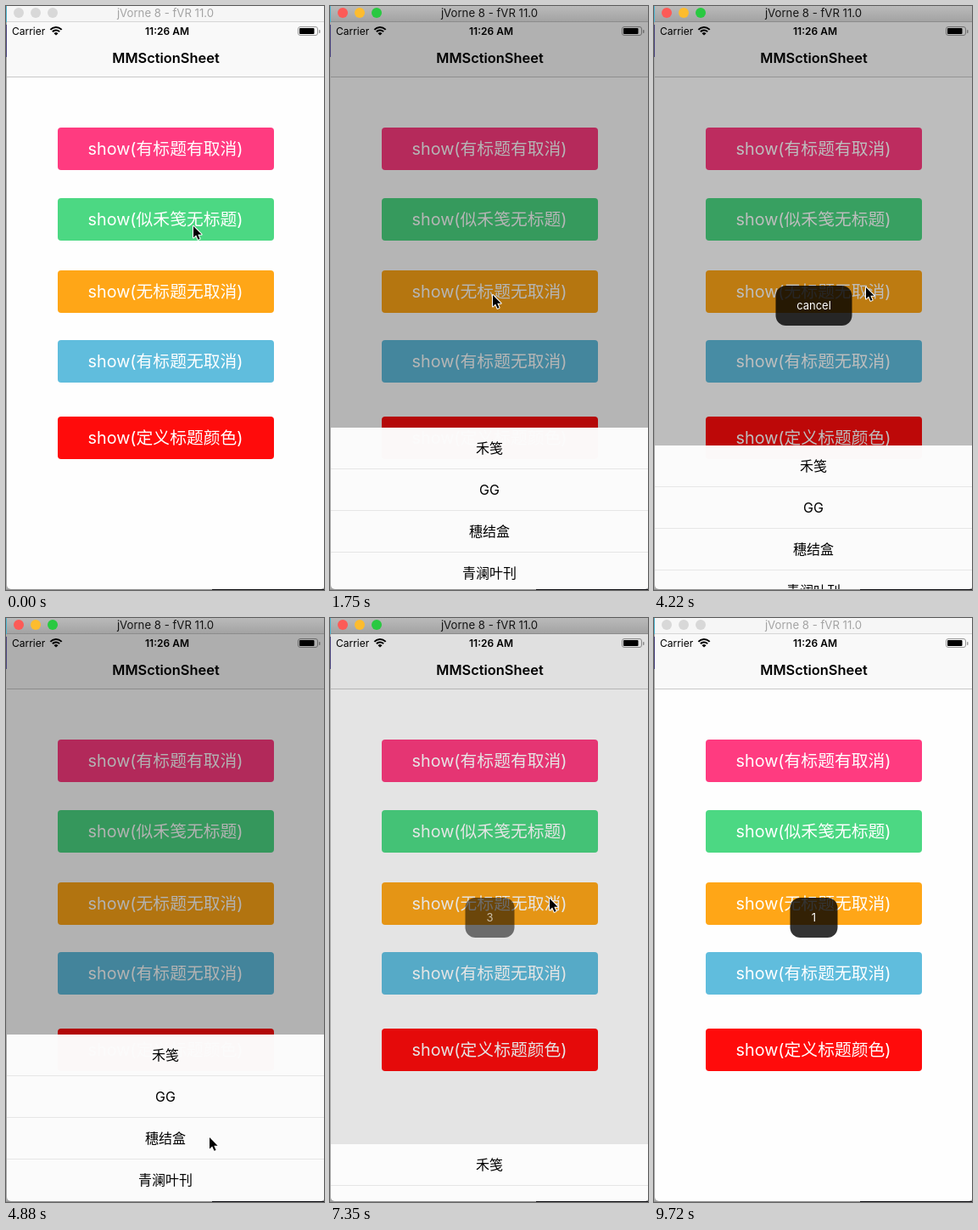
An HTML page with a canvas for the animation above (9.75 s loop, 375 by 687 pixels).

```html
<!DOCTYPE html>
<html lang="zh-CN">
<head>
<meta charset="utf-8">
<title>MMSctionSheet</title>
<style>
html, body { margin: 0; height: 100%; overflow: hidden; background: #fff; }
canvas { display: block; width: 375px; height: 687px; }
</style>
</head>
<body>
<canvas id="stage"></canvas>
<script>
const W = 375, H = 687, LOOP = 9750, SLIDE = 300, ROW = 49, BOTTOM = 686, MID = 188;
const canvas = document.getElementById('stage');
const ctx = canvas.getContext('2d');
const dpr = window.devicePixelRatio || 1;
canvas.width = W * dpr;
canvas.height = H * dpr;

const buttons = [
  [143, '#ff3b80', 'show(有标题有取消)'],
  [226, '#4cd883', 'show(似禾笺无标题)'],
  [311, '#ffa617', 'show(无标题无取消)'],
  [393, '#60bddd', 'show(有标题无取消)'],
  [483, '#ff0b0b', 'show(定义标题颜色)']
];
const rows = ['禾笺', 'GG', '穗结盒', '青澜叶刊'];
// Start of opening, start of closing
const sheets = [[1481, 2593], [3990, 5250], [7232, 8154]];
// Start, label, width
const toasts = [[2600, 'cancel', 90], [5265, '3', 58], [8154, '1', 56]];
// Time, x, y of the pointer tip
const path = [
  [30, 221, 258], [320, 192, 339], [1820, 192, 339], [2260, 309, 404],
  [2320, 309, 404], [2440, 328, 379], [2900, 328, 379], [3560, 253, 331],
  [3620, 250, 330], [4330, 250, 330], [4860, 240, 610], [5420, 240, 610],
  [5940, 337, 297], [6000, 337, 297], [6180, 364, 307], [6570, 364, 307],
  [7170, 259, 329], [7600, 259, 329], [8100, 217, 510], [8360, 217, 510],
  [8590, 315, 558], [8650, 315, 558], [9120, 328, 353]
];

const clamp = v => Math.min(1, Math.max(0, v));
const ease = v => { v = clamp(v); return v * v * (3 - 2 * v); };

function rect(x, y, w, h, color, radius = 0) {
  ctx.fillStyle = color;
  ctx.beginPath();
  ctx.roundRect(x, y, w, h, radius);
  ctx.fill();
}

function text(str, x, y, size, color, weight = 400, align = 'center') {
  ctx.font = `${weight} ${size}px Inter, "Noto Sans CJK SC", "Noto Sans CJK", sans-serif`;
  ctx.textAlign = align;
  ctx.fillStyle = color;
  ctx.fillText(str, x, y);
}

function disc(x, y, r, color) {
  ctx.fillStyle = color;
  ctx.beginPath();
  ctx.arc(x, y, r, 0, 7);
  ctx.fill();
}

function drawDesktop() {
  rect(0, 0, W, H, '#a9a9a9');
  rect(0, 0, 1, 19, '#4fb4cf');
  rect(0, 22, 1, 38, '#4b4580');
  rect(0, 686, 243, 1, '#909090');
  rect(243, 686, 132, 1, '#101014');
}

function drawTitleBar(active) {
  let fill = '#f6f6f6';
  if (active) {
    fill = ctx.createLinearGradient(0, 0, 0, 18);
    fill.addColorStop(0, '#bababa');
    fill.addColorStop(1, '#a3a3a3');
  }
  rect(1, 0, W, 18, fill);
  rect(1, 18, W, 1, active ? '#8c8c8c' : '#d6d6d6');
  const lights = active ? ['#fc5b57', '#fdbc2e', '#29c941'] : Array(3).fill('#d8d8d8');
  lights.forEach((c, i) => disc(15 + 20 * i, 8, 6, c));
  text('jVorne 8 - fVR 11.0', MID, 13, 13.2, active ? '#151515' : '#a4a4a4');
}

function drawStatus() {
  text('Carrier', 7, 34, 12, '#000', 400, 'left');
  text('11:26 AM', 190, 34, 12, '#000', 600);
  ctx.strokeStyle = '#000';
  ctx.lineWidth = 2;
  for (const r of [9, 5.6]) {
    ctx.beginPath();
    ctx.arc(59, 34, r, -2.4, -0.74);
    ctx.stroke();
  }
  ctx.fillStyle = '#000';
  ctx.beginPath();
  ctx.moveTo(59, 34.5);
  ctx.arc(59, 34.5, 3.4, -2.4, -0.74);
  ctx.fill();
  ctx.strokeStyle = '#999';
  ctx.lineWidth = 1;
  ctx.beginPath();
  ctx.roundRect(344.5, 24.5, 23, 10, 2.5);
  ctx.stroke();
  rect(346, 26, 17.5, 7, '#000', 1);
  rect(369, 28, 1.5, 4, '#999', 1);
}

function drawApp() {
  rect(1, 19, W, 667, '#fefefe', [0, 0, 5, 5]);
  rect(1, 19, W, 64, '#f9f9f9');
  rect(1, 83, W, 1, '#c8c8c8');
  drawStatus();
  text('MMSctionSheet', 188.5, 67, 16.4, '#000', 600);
  for (const [y, color, label] of buttons) {
    rect(61, y, 255, 50, color, 4);
    text(label, MID, y + 32, 19.8, '#fff');
  }
}

function drawSheet(t) {
  let open = 0;
  for (const [up, down] of sheets) {
    open += ease((t - up) / SLIDE) - ease((t - down) / SLIDE);
  }
  if (open <= 0) return;
  ctx.save();
  ctx.beginPath();
  ctx.roundRect(1, 19, W, 667, [0, 0, 5, 5]);
  ctx.clip();
  rect(1, 19, W, 667, `rgba(0,0,0,${0.3 * open})`);
  const top = Math.round(BOTTOM - ROW * rows.length * open);
  rect(1, top, W, BOTTOM - top, 'rgba(252,252,252,.985)');
  rows.forEach((label, i) => {
    const y = top + ROW * i;
    text(label, MID, y + 30, 16, '#000');
    if (i < rows.length - 1) rect(1, y + 48, W, 1, '#e6e6e6');
  });
  ctx.restore();
}

function drawToast(t) {
  for (const [start, label, w] of toasts) {
    const age = t - start;
    const alpha = clamp(age / 150) * (1 - clamp((age - 2000) / 250));
    if (alpha <= 0) continue;
    ctx.globalAlpha = alpha;
    rect(188.5 - w / 2, 329, w, 47, 'rgba(0,0,0,.8)', 12);
    text(label, 188.5, 357, 13, '#fff');
    ctx.globalAlpha = 1;
  }
}

function pointerAt(t) {
  const i = path.findIndex(p => p[0] > t);
  if (i === 0) return path[0].slice(1);
  if (i < 0) return path[path.length - 1].slice(1);
  const [t0, x0, y0] = path[i - 1], [t1, x1, y1] = path[i];
  const k = ease((t - t0) / (t1 - t0));
  return [x0 + (x1 - x0) * k, y0 + (y1 - y0) * k];
}

function drawPointer(t) {
  const [x, y] = pointerAt(t).map(Math.round);
  ctx.save();
  ctx.translate(x, y);
  const arrow = new Path2D('M0 1V14.5L3.2 11.6L5.5 16.8L7.6 15.9L5.3 10.8H9.6Z');
  ctx.strokeStyle = '#fff';
  ctx.lineWidth = 2;
  ctx.lineJoin = 'round';
  ctx.stroke(arrow);
  ctx.fillStyle = '#000';
  ctx.fill(arrow);
  ctx.restore();
}

function draw(now) {
  const t = now % LOOP;
  ctx.setTransform(dpr, 0, 0, dpr, 0, 0);
  drawDesktop();
  drawTitleBar(t >= 1310 && t < 9720);
  drawApp();
  drawSheet(t);
  drawToast(t);
  if (t < 9720) drawPointer(t);
}

let start;
function tick(now) {
  start ??= now;
  draw(now - start);
  requestAnimationFrame(tick);
}
draw(0);
requestAnimationFrame(tick);
</script>
</body>
</html>
```
